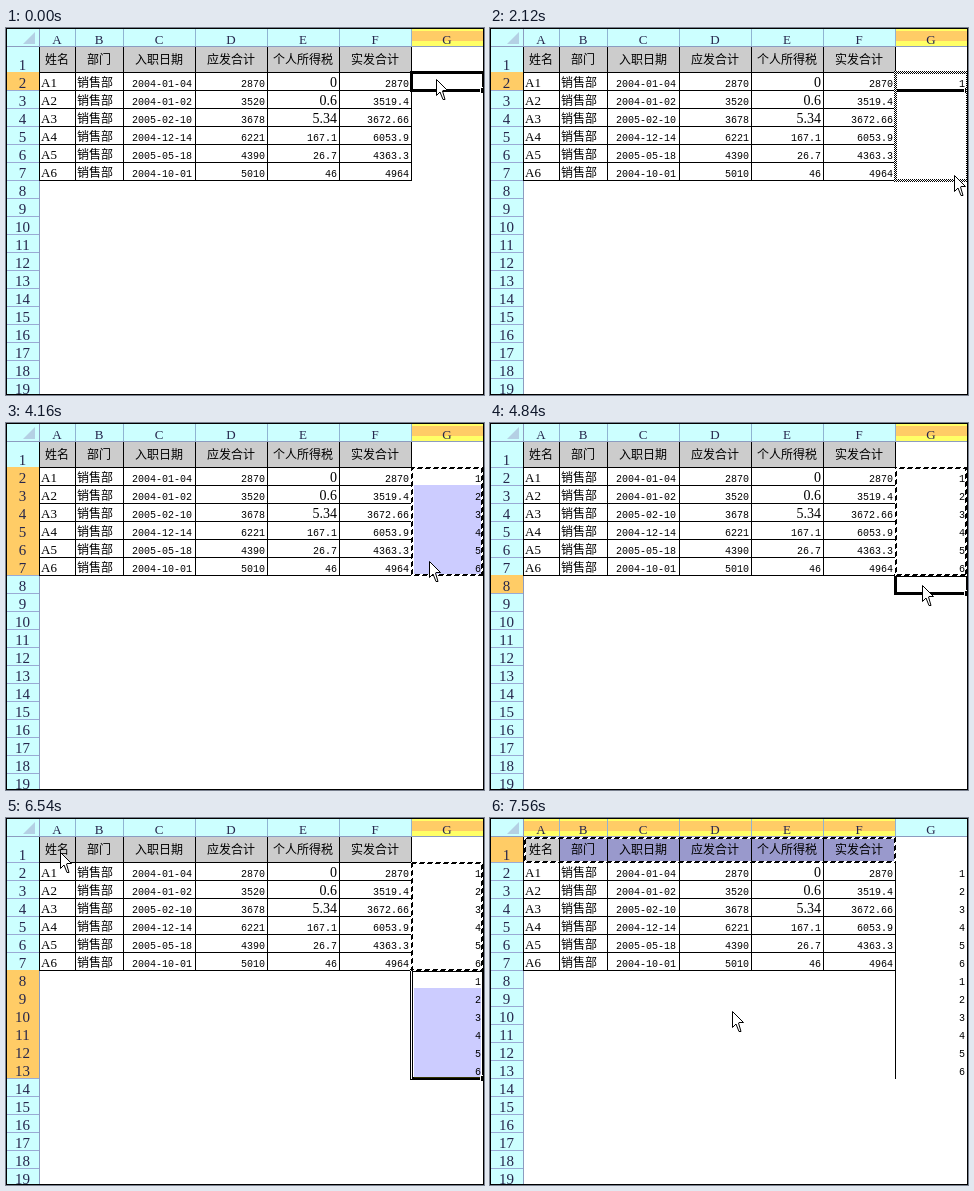
An HTML page with a canvas for the animation above (8000 ms loop, 478 by 367 pixels).

```html
<!DOCTYPE html>
<html lang="zh">
<head>
<meta charset="utf-8">
<style>
html, body { margin: 0; width: 100%; height: 100%; overflow: hidden; background: #fff; }
canvas { display: block; width: 478px; height: 367px; }
</style>
</head>
<body>
<canvas id="sheet" width="478" height="367"></canvas>
<script>
const ctx = document.getElementById('sheet').getContext('2d');
const LOOP = 8000;
const SERIF = '"Liberation Serif", serif';
const CJK = '12px "Noto Sans CJK SC", "Noto Sans CJK", sans-serif';
const MONO = '10px "Liberation Mono", monospace';
const colLines = [33, 69, 117, 189, 261, 333, 405, 477];
const rowLine = row => row ? 26 + 18 * row : 18;   // bottom line of a row
const titles = ['姓名', '部门', '入职日期', '应发合计', '个人所得税', '实发合计'];
const people = [
  ['2004-01-04', '2870', '0', '2870'],
  ['2004-01-02', '3520', '0.6', '3519.4'],
  ['2005-02-10', '3678', '5.34', '3672.66'],
  ['2004-12-14', '6221', '167.1', '6053.9'],
  ['2005-05-18', '4390', '26.7', '4363.3'],
  ['2004-10-01', '5010', '46', '4964']
];

// Ranges are [first column, first row, last column, last row]; columns count from 0.
const G = (first, last = first) => [6, first, 6, last];
const steps = [
  { t: 0, cursor: [430, 51], sel: G(2), rows: [2, 2], count: 0, copy: null, phase: 0 },
  { t: 100, cursor: [429, 54] },
  { t: 420, cursor: [446, 78], sel: G(4) },
  { t: 760, cursor: [464, 43], rows: [4, 4] },
  { t: 1100, cursor: [448, 24], sel: G(1), rows: [1, 1] },
  { t: 1440, cursor: [467, 62], sel: G(2), rows: [2, 2], count: 1 },
  { t: 1780, cursor: [470, 62] },
  { t: 2120, cursor: [464, 147], drag: G(2, 7) },
  { t: 2800, drag: null, sel: G(2, 7), rows: [2, 7], count: 6 },
  { t: 3480, cursor: [440, 94] },
  { t: 3820, cursor: [442, 68] },
  { t: 4160, cursor: [423, 138], copy: G(2, 7) },
  { t: 4840, cursor: [432, 162], sel: G(8), rows: [8, 8], phase: 2 },
  { t: 5180, cursor: [448, 209], sel: G(8, 13), rows: [8, 13], count: 12, phase: 4 },
  { t: 5520, cursor: [358, 150], phase: 6 },
  { t: 5860, cursor: [222, 78] },
  { t: 6200, cursor: [89, 21] },
  { t: 6540, cursor: [54, 34] },
  { t: 6880, cursor: [285, 34], sel: [0, 1, 4, 1], rows: [1, 1], phase: 1 },
  { t: 7220, cursor: [362, 34], sel: [0, 1, 5, 1], phase: 3 },
  { t: 7560, cursor: [242, 193], copy: [0, 1, 5, 1], phase: 0 }
];
steps.forEach((step, i) => { steps[i] = { ...steps[i - 1], ...step }; });

function fill(color, x, y, w, h) {
  ctx.fillStyle = color;
  ctx.fillRect(x, y, w, h);
}

function text(value, x, y, font, align = 'left', color = '#000') {
  ctx.font = font;
  ctx.textAlign = align;
  ctx.fillStyle = color;
  ctx.fillText(value, x, y);
}

function edges([c1, r1, c2, r2]) {
  const x = colLines[c1], y = rowLine(r1 - 1);
  return { x, y, right: colLines[c2 + 1], bottom: rowLine(r2) };
}

const within = (n, a, b) => n >= a && n <= b;

function drawHeaders({ sel, rows }) {
  fill('#ccffff', 0, 0, 478, 18);
  fill('#ccffff', 0, 18, 33, 349);
  ctx.fillStyle = '#b4d0e4';
  ctx.beginPath();
  ctx.moveTo(29, 4);
  ctx.lineTo(29, 16);
  ctx.lineTo(17, 16);
  ctx.fill();

  for (let c = 0; c < 7; c++) {
    const x = colLines[c], w = colLines[c + 1] - x;
    if (within(c, sel[0], sel[2])) {
      fill('#ffff66', x, 1, w, 17);
      fill('#ffcc66', x, 3, w, 10);
    }
    text('ABCDEFG'[c], x + w / 2, 16, `13px ${SERIF}`, 'center', '#26264c');
    fill('#8fb4d2', x, 1, 1, 17);
  }
  for (let r = 1; r <= 19; r++) {
    const top = rowLine(r - 1), bottom = rowLine(r);
    if (within(r, ...rows)) fill('#ffcc66', 1, top, 32, bottom - top);
    text(r, 16.5, bottom - 2, `15px ${SERIF}`, 'center', '#26264c');
    fill('#99aad4', 1, bottom, 32, 1);
  }
  fill('#8c9cc0', 33, 0, 1, 367);
  fill('#8c9cc0', 0, 18, 478, 1);
}

function drawShade({ sel }) {
  const [c1, r1, c2, r2] = sel;
  for (let c = c1; c <= c2; c++) {
    for (let r = r1; r <= r2; r++) {
      if (c === c1 && r === r1) continue;
      const box = edges([c, r, c, r]);
      const color = r === 1 && c < 6 ? '#9999cc' : '#ccccff';
      const left = c === 6 ? 3 : 1;
      fill(color, box.x + left, box.y, box.right - box.x - left - (c === 6 ? 2 : 0), box.bottom - box.y);
    }
  }
}

function drawGrid({ count }) {
  for (const x of colLines.slice(0, 7)) fill('#000', x, 19, 1, 134);
  for (let r = 1; r <= 7; r++) fill('#000', 33, rowLine(r), 373, 1);
  if (count > 6) fill('#000', 405, 153, 1, 108);
}

function drawValues({ count }) {
  titles.forEach((title, c) =>
    text(title, (colLines[c] + colLines[c + 1]) / 2, 36, CJK, 'center'));
  people.forEach((person, i) => {
    const base = rowLine(i + 2) - 3;
    text('A' + (i + 1), 35, base, `13px ${SERIF}`);
    text('销售部', 71, base, CJK);
    person.forEach((value, k) => {
      const large = k === 2 && i < 3;
      const right = k ? colLines[k + 3] - 2 : 186;
      text(value, right, base, large ? `14px ${SERIF}` : MONO, 'right');
    });
  });
  for (let i = 0; i < count; i++) text(i % 6 + 1, 475, rowLine(i + 2) - 3, MONO, 'right');
}

// A range of several cells gets an inverting border, so grid lines show light inside it.
function drawSelection({ sel }) {
  const { x, y, right, bottom } = edges(sel);
  const several = sel[0] !== sel[2] || sel[1] !== sel[3];
  ctx.save();
  ctx.lineWidth = 3;
  ctx.strokeStyle = several ? '#fff' : '#000';
  if (several) ctx.globalCompositeOperation = 'difference';
  ctx.strokeRect(x + 0.5, y + 0.5, right - x, bottom - y);
  ctx.restore();
  fill('#fff', right - 3, bottom - 3, 7, 7);
  fill('#000', right - 2, bottom - 2, 5, 5);
}

// Paints a frame pixel by pixel; the ends are inclusive.
function drawRim(x1, y1, x2, y2, width, isDark) {
  for (let y = y1; y <= y2; y++) {
    for (let x = x1; x <= x2; x++) {
      const depth = Math.min(x - x1, x2 - x, y - y1, y2 - y);
      if (depth < width) fill(isDark(x + y) ? '#000' : '#fff', x, y, 1, 1);
    }
  }
}

function drawAnts({ copy, phase }) {
  const { x, y, right, bottom } = edges(copy);
  drawRim(Math.max(x, 34), Math.max(y, 19), Math.min(right, 476), bottom, 2,
    sum => (sum + phase) % 8 < 5);
}

function drawDrag({ drag }) {
  const { x, y, right, bottom } = edges(drag);
  drawRim(x - 1, y - 1, right + 1, bottom + 1, 3, sum => sum % 2);
}

const arrow = new Path2D('M.5 .5V16.5L4 13L7 20.5H9L6.5 12L7 11.5H11.5Z');

function drawCursor({ cursor }) {
  ctx.save();
  ctx.translate(...cursor);
  ctx.fillStyle = '#fff';
  ctx.strokeStyle = '#000';
  ctx.lineWidth = 1;
  ctx.fill(arrow);
  ctx.stroke(arrow);
  ctx.restore();
}

function draw(state) {
  fill('#fff', 0, 0, 478, 367);
  fill('#ccc', 34, 19, 372, 25);
  drawHeaders(state);
  drawShade(state);
  drawGrid(state);
  drawValues(state);
  if (String(state.sel) !== String(state.copy)) drawSelection(state);
  if (state.copy) drawAnts(state);
  if (state.drag) drawDrag(state);
  drawCursor(state);
  ctx.lineWidth = 1;
  ctx.strokeStyle = '#000';
  ctx.strokeRect(0.5, 0.5, 477, 366);
}

const start = performance.now();
function tick() {
  const time = (performance.now() - start) % LOOP;
  draw(steps.findLast(step => step.t <= time));
  requestAnimationFrame(tick);
}
tick();
</script>
</body>
</html>
```
